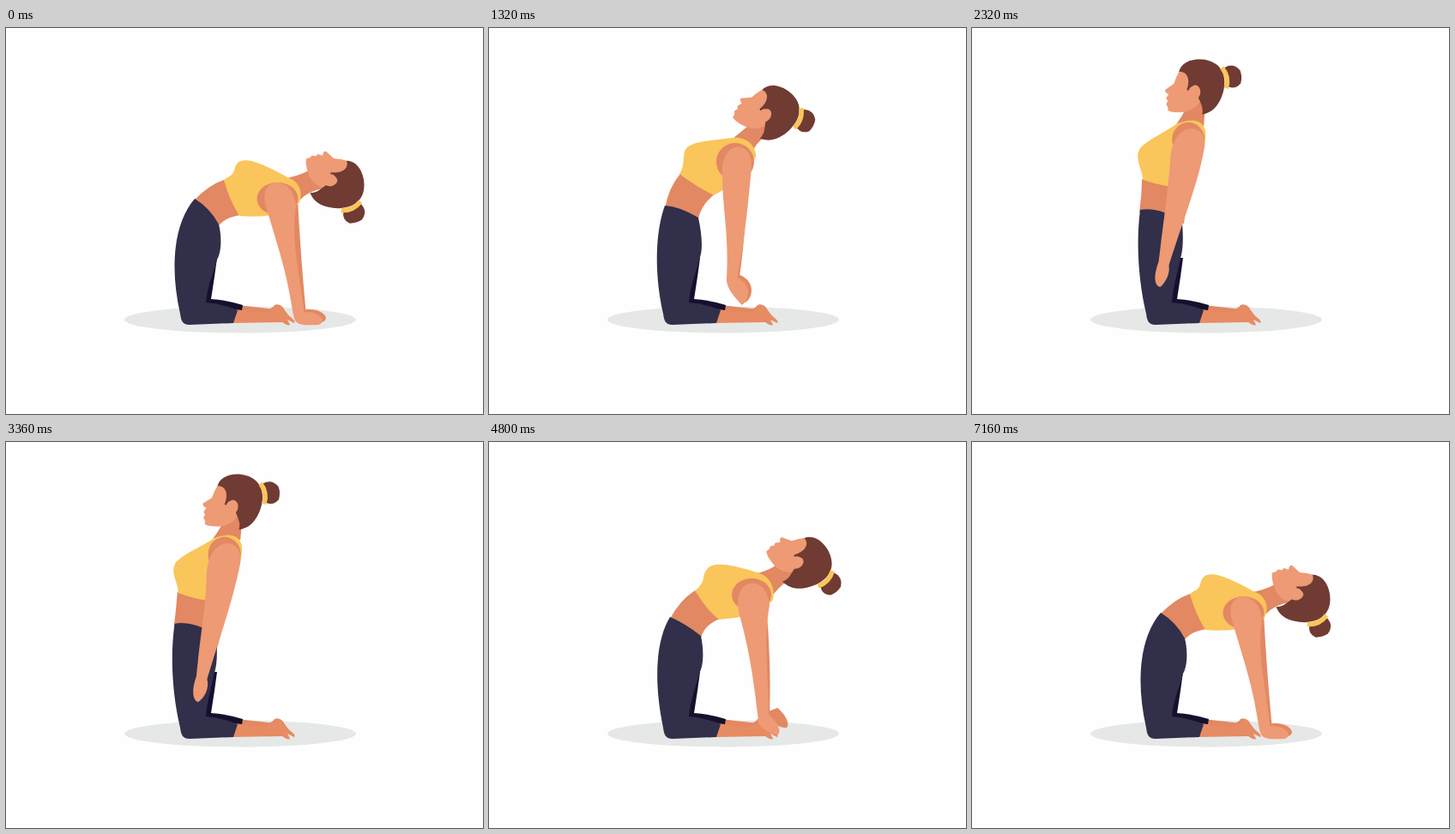
These frames come from a looping animation (556x450 px, 7200 ms). An HTML page:

```html
<!DOCTYPE html>
<html lang="en">
<head>
<meta charset="utf-8">
<title>Camel pose</title>
<style>
html, body { margin: 0; width: 100%; height: 100%; overflow: hidden; background: #fefefe; }
svg { display: block; width: 556px; height: 450px; }
.skin { fill: #ee9a74; }
.shade { fill: #e28862; }
.top { fill: #fac55b; }
.hair { fill: #6f3b33; }
.pants { fill: #312f4a; }
</style>
</head>
<body>
<svg viewBox="0 0 556 450">
  <ellipse cx="273" cy="340" rx="135" ry="15.5" fill="#e5e8e7"/>
  <path id="farArm" fill="none" stroke="#e28862" stroke-width="14"/>
  <path id="farHand" class="shade"/>
  <path class="shade" d="M270 323L305 327Q310 328 313 323Q318 321 322 325L330 336L268 334Z"/>
  <path fill="#e78b63" d="M266 327Q285 333 306 331Q314 328 314 324Q319 321 323 326Q326 333 333 338Q338 342 336 344L328 340L331 346Q329 348 322 343L262 344Z"/>
  <path d="M246 268L243 290L239 316Q257 317 276 323L275 329L225 323L228 268Z" fill="#15102d"/>
  <path id="waist" class="shade"/>
  <path id="legs" class="pants"/>
  <path id="neck" class="shade"/>
  <path id="bra" class="top"/>
  <circle id="armhole" class="shade" r="1"/>
  <g id="head">
    <path class="hair" d="M294 46Q304 40 312 49Q315 56 313 64Q307 72 298 68Z"/>
    <path class="skin" d="M243 47L238 57Q236 62 235 65L225 72Q224 75 229 77L226 82L228 85L226 89Q229 92 228 96Q232 99 246 98C255 97 262 92 266 84L275 75L270 45Z"/>
    <path class="hair" d="M241 51C245 34 272 33 284 42C298 52 295 72 289 84C284 94 278 99 268 101C270 92 266 88 264 82L259 68Q254 67 252 73L250 72C254 62 252 50 241 51Z"/>
    <ellipse class="skin" cx="260" cy="74.5" rx="6" ry="8"/>
    <path d="M291 46Q300 57 296 70" fill="none" stroke="#fac55b" stroke-width="5.5"/>
  </g>
  <path id="hand" class="skin"/>
  <path id="arm" class="skin"/>
</svg>
<script>
// Every part has five poses, from the full backbend to upright.
const hands = [
  'M335 333C336 346 342 347 364 346C376 342 364 330 348 331Z',
  'M313 323C313 332 328 342 337 341C342 335 332 322 326 318Z',
  'M277 291C276 304 288 315 295 323C303 318 308 300 289 291Z',
  'M247 279C243 292 249 306 252 311C262 311 272 292 261 279Z',
  'M217 273C211 290 212 300 219 302C226 296 231 285 229 276Z'
];
const headPose = (x, y, turn) => `translate(${x} ${y}) rotate(${turn}) translate(-267 -68)`;
const armhole = (x, y, rx, ry) => `translate(${x} ${y}) scale(${rx} ${ry})`;
const legs = (left, waist, thigh, seat) =>
  `M${waist}C${seat}C${thigh} 235 298 233 320Q250 321 270 329L265 344L214 346C205 346 204 340 203 333C${left}Z`;

const parts = {
  farArm: ['d', [
    'M333 200Q337 275 343 335',
    'M316 190Q322 255 320 315',
    'M292 165Q294 230 285 290',
    'M276 150Q268 220 257 275',
    'M258 145Q244 210 225 272'
  ]],
  farHand: ['d', hands],
  hand: ['d', hands],
  waist: ['d', [
    'M254 177Q236 183 218 202L248 230Q257 220 274 218Z',
    'M240 173Q222 185 211 206L247 228Q252 212 270 206Z',
    'M223 170Q210 185 205 210L244 222Q248 205 264 193Z',
    'M210 170Q202 190 200 214L244 220Q247 205 253 188Z',
    'M198 176Q198 195 195 215L247 228Q250 205 251 185Z'
  ]],
  legs: ['d', [
    legs('191 280 195 228 220 199', '220 199Q238 210 248 229', '244 280', '251 240 252 260 246 270'),
    legs('192 280 194 232 211 204', '211 204Q228 211 247 226', '243 280', '250 240 251 259 245 270'),
    legs('193 290 193 240 205 207', '205 207Q222 208 244 221', '243 280', '248 240 250 259 245 270'),
    legs('193 290 192 245 200 210', '200 210Q215 209 243 217', '242 280', '247 240 248 258 243 271'),
    legs('194 295 191 250 196 212', '196 212Q218 208 245 226', '241 280', '246 240 247 258 242 272')
  ]],
  neck: ['d', [
    'M362 160Q350 170 328 175L342 201Q352 190 370 187Z',
    'M342 136Q334 148 312 153L331 178Q342 164 358 156Z',
    'M312 106Q300 116 284 129L308 142Q314 130 330 122Z',
    'M280 92Q270 106 259 118L290 120Q292 108 298 96Z',
    'M252 86Q247 100 238 112L270 114Q271 100 272 86Z'
  ]],
  bra: ['d', [
    'M254 177C259 173 264 173 266 166C270 147 288 152 330 175C340 178 347 190 342 203C335 215 305 222 272 219Q260 200 254 177Z',
    'M240 173C246 169 250 163 250 157C254 139 270 139 312 152C326 155 334 168 331 184C320 195 310 204 268 207Q252 194 240 173Z',
    'M222 170C228 162 226 152 228 144C232 133 250 132 284 128C298 126 312 136 311 150C306 160 290 180 262 195Q240 184 222 170Z',
    'M210 172C214 162 204 154 210 142C217 131 240 127 262 117C272 113 290 115 291 130C291 145 272 165 252 189Q230 184 210 172Z',
    'M199 177C199 165 188 152 196 140C204 131 220 124 240 111C255 106 268 105 272 120C274 140 262 160 251 186Q225 186 199 177Z'
  ]],
  armhole: ['transform', [
    armhole(316.5, 199, 24, 19),
    armhole(306, 178, 23, 19),
    armhole(287, 156, 22, 22),
    armhole(269, 139, 20, 22),
    armhole(252, 130, 19, 20)
  ]],
  arm: ['d', [
    'M303 208C293 172 334 170 338 207C332 250 341 275 348 335L335 335C327 285 321 268 303 208Z',
    'M291 198C283 157 324 153 327 190C319 235 326 272 326 320L314 325C308 275 304 245 291 198Z',
    'M272 172C269 130 308 128 306 163C302 205 298 250 289 293L277 293C280 240 272 210 272 172Z',
    'M250 175C243 110 291 115 287 150C276 195 275 225 261 280L247 280C247 235 253 215 250 175Z',
    'M231 155C232 108 274 108 271 138C264 180 247 220 229 277L217 275C223 225 227 200 231 155Z'
  ]],
  head: ['transform', [
    headPose(386.3, 183.8, 77),
    headPose(368.5, 143, 55),
    headPose(332, 100, 31),
    headPose(298.5, 79, 15),
    headPose(267, 68, 0)
  ]]
};

const LOOP = 7200;
const times = [0, 760, 1320, 1720, 2370, 3110, 3880, 4290, 4800, 5570, LOOP];
const order = [0, 1, 2, 3, 4, 4, 3, 2, 1, 0, 0];
const NUM = /-?\d+(\.\d+)?/g;
for (const part of Object.values(parts)) part.push(part[1].map(s => s.match(NUM).map(Number)));

// Hermite weights of the five poses; the motion rests at both extremes.
function weights(t) {
  let i = 0;
  while (t >= times[i + 1]) i++;
  const span = times[i + 1] - times[i], s = (t - times[i]) / span;
  const w = [0, 0, 0, 0, 0];
  const rise = s * s * (3 - 2 * s);
  w[order[i]] += 1 - rise;
  w[order[i + 1]] += rise;
  const addSlope = (k, amount) => {
    if (order[k] % 4 === 0) return;
    const slope = amount * span / (times[k + 1] - times[k - 1]);
    w[order[k + 1]] += slope;
    w[order[k - 1]] -= slope;
  };
  addSlope(i, s * (1 - s) * (1 - s));
  addSlope(i + 1, s * s * (s - 1));
  return w;
}

const mix = (w, values) => w.reduce((sum, k, i) => sum + k * values[i], 0);

function draw(now) {
  const w = weights(now % LOOP);
  for (const [id, [attr, poses, nums]] of Object.entries(parts)) {
    let n = 0;
    const value = poses[0].replace(NUM, () => {
      const v = mix(w, nums.map(p => p[n]));
      n++;
      return v.toFixed(2);
    });
    document.getElementById(id).setAttribute(attr, value);
  }
  const dx = mix(w, [4, 10, 4, 2, 0]), dy = mix(w, [-3, -8, -3, -2, 0]);
  document.getElementById('farHand').setAttribute('transform', `translate(${dx} ${dy})`);
  requestAnimationFrame(draw);
}
requestAnimationFrame(draw);
</script>
</body>
</html>
```
